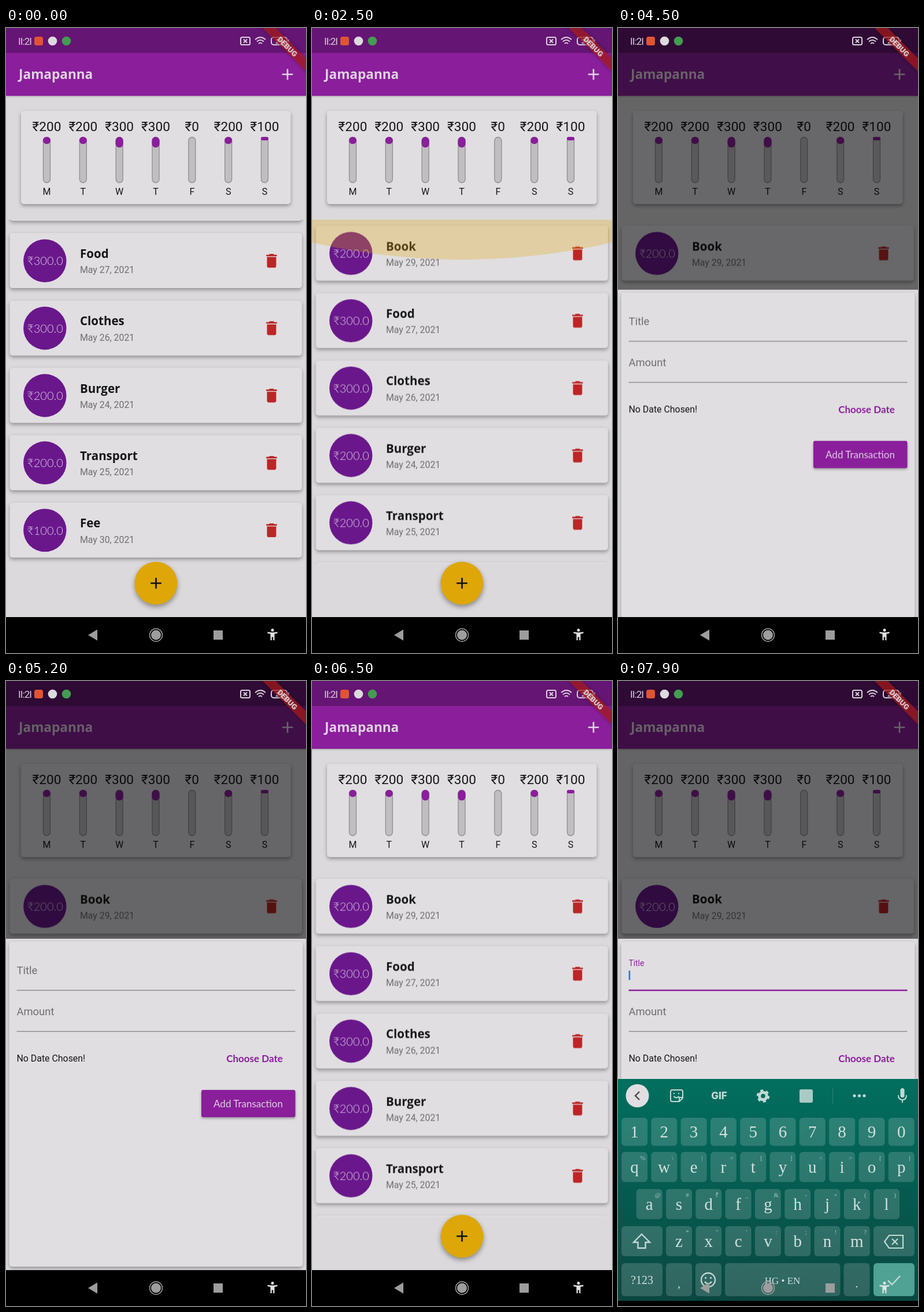
Write an HTML page that moves like this. It is 519 px wide and 1079 px high and loops after 8 s.

```html
<!DOCTYPE html>
<html lang="en">
<head>
<meta charset="utf-8">
<title>Expense tracker</title>
<style>
  html, body { margin: 0; width: 100%; height: 100%; overflow: hidden; background: #000; }
  #stage { display: block; width: 100%; height: 100%; font-family: Roboto, sans-serif; }
  .mid { text-anchor: middle; }
  .bold { font-family: "Open Sans", sans-serif; font-weight: 700; }
  .round { font-family: Lato, sans-serif; }
  .card { fill: #e0dee1; filter: drop-shadow(0 3.5px 3px rgba(0,0,0,.34)); }
  .ink { fill: #161617; }
  .muted { fill: #6f6d70; }
  .line { fill: none; stroke: currentColor; stroke-width: 2; }
  .key { fill: rgba(255,255,255,.16); }
  .glyph { font: 29px "Liberation Serif", serif; fill: #d3e0de; text-anchor: middle; }
  .hint { font: 11px "Liberation Serif", serif; fill: #a9c6c1; text-anchor: middle; }
</style>
</head>
<body>
<svg id="stage" viewBox="0 0 519 1079">
  <defs>
    <linearGradient id="teal" x1="0" y1="0" x2="0" y2="1">
      <stop offset="0" stop-color="#016f5f"/>
      <stop offset="1" stop-color="#0a4741"/>
    </linearGradient>
    <path id="trash" d="M6 19c0 1.1.9 2 2 2h8c1.1 0 2-.9 2-2V7H6v12zM19 4h-3.5l-1-1h-5l-1 1H5v2h14V4z"/>
    <path id="plus" d="M-9.3 0H9.3M0-9.3V9.3" stroke-width="2.7"/>
  </defs>

  <rect width="519" height="1017" fill="#dbd9dc"/>
  <rect y="30" width="519" height="87" fill="#8a1e9b" style="filter:drop-shadow(0 1px 1.5px rgba(0,0,0,.3))"/>
  <rect width="519" height="43" fill="#651573"/>
  <text class="bold" x="22" y="88" font-size="22.6" fill="#e0d5e2">Jamapanna</text>
  <use href="#plus" x="487" y="80" stroke="#e0d5e2"/>
  <g id="chart"><rect class="card" x="26" y="143" width="466.5" height="161" rx="5"/></g>

  <svg y="331" width="519" height="594">
    <g id="list"></g>
    <g id="glow" opacity="0"><circle cx="259.5" cy="-674" r="778" fill="#e2ab10"/></g>
  </svg>

  <circle cx="259.5" cy="958.5" r="37" fill="#dea707" style="filter:drop-shadow(0 4px 4px rgba(0,0,0,.38))"/>
  <g transform="translate(259.5 958.5)"><circle id="ripple" r="37" fill="#fff" opacity="0"/></g>
  <use href="#plus" x="259.5" y="958.5" stroke="#111"/>

  <rect id="scrim" width="519" height="1017" opacity="0"/>

  <g id="sheet">
    <rect y="445" width="519" height="572" fill="#dedcdf"/>
    <rect class="card" x="5.5" y="450" width="508" height="561" rx="5"/>
    <g id="label"><text font-size="18.4">Title</text></g>
    <path d="M18.5 534H500.5M18.5 605H500.5" stroke="#918f92" stroke-width="1.5"/>
    <g id="focus" opacity="0">
      <path d="M18.5 534H500.5" stroke="#8a1e9b" stroke-width="2.7"/>
      <rect x="18.5" y="500" width="2.7" height="16" fill="#2f7bcb"/>
    </g>
    <text class="muted" x="18.5" y="577" font-size="18.4">Amount</text>
    <text class="ink" x="18.5" y="657" font-size="15.9">No Date Chosen!</text>
    <text class="round mid" x="430" y="658" font-size="17" font-weight="700" fill="#8a1e9b">Choose Date</text>
    <rect x="338" y="706" width="162.5" height="47" rx="3" fill="#8a1e9b" style="filter:drop-shadow(0 2px 2px rgba(0,0,0,.35))"/>
    <text class="round mid" x="419" y="736" font-size="17" fill="#dfcfe3">Add Transaction</text>
  </g>

  <g id="status" color="#d9cfdc">
    <text x="21" y="29" font-size="17" letter-spacing="-.9" fill="#d9cfdc">II:2I</text>
    <rect x="49" y="15" width="15" height="15" rx="3.5" fill="#df5534"/>
    <circle cx="80.5" cy="22.5" r="7.8" fill="#dcdade"/>
    <circle cx="104.5" cy="22.5" r="7.8" fill="#429d51"/>
    <rect class="line" x="406" y="16" width="16" height="13" rx="2.5" stroke-width="1.6"/>
    <path class="line" d="M411 19.5l6 6M417 19.5l-6 6"/>
    <path class="line" d="M431 20Q440 12 449 20M434 23.5Q440 18 446 23.5M437 27Q440 24 443 27"/>
    <rect class="line" x="459" y="16" width="27" height="13" rx="4"/>
    <path class="line" d="M488.500 20v5"/>
    <text class="mid" x="472.500" y="27" font-size="11.5" font-weight="700" fill="#d9cfdc">29</text>
  </g>
  <g transform="translate(519 0) rotate(45)">
    <rect x="-60" y="37" width="120" height="16" fill="rgba(183,28,28,.66)" style="filter:drop-shadow(0 0 3px rgba(0,0,0,.45))"/>
    <text class="mid" y="49.800" font-size="13.300" font-weight="900" fill="#ded5d9">DEBUG</text>
  </g>

  <rect y="1017" width="519" height="62"/>
  <g id="keyboard"><rect y="687" width="519" height="383" fill="url(#teal)"/></g>
  <g fill="#9d9d9d">
    <path d="M142 1048l16-9.500v19z"/>
    <circle cx="259.500" cy="1048" r="8.500"/>
    <circle cx="259.500" cy="1048" r="11" fill="none" stroke="#9d9d9d" stroke-width="1.500"/>
    <rect x="359" y="1040" width="16" height="16"/>
  </g>
  <g fill="#e2e2e2">
    <circle cx="461" cy="1039.500" r="2.500"/>
    <path d="M452.500 1042.500q8.500 2 17 0v2.500l-5 1v11h-2.300v-5.500h-2.400v5.500h-2.300v-11l-5-1z"/>
  </g>
</svg>

<script>
const LOOP = 8000;
const $ = id => document.getElementById(id);
const add = (id, markup) => $(id).insertAdjacentHTML('beforeend', markup);
const text = (cls, x, y, str, attrs = '') => `<text class="${cls}" x="${x}" y="${y}" ${attrs}>${str}</text>`;

// Weekly chart
[['M', 200], ['T', 200], ['W', 300], ['T', 300], ['F', 0], ['S', 200], ['S', 100]].forEach(([day, sum], i) => {
  const x = 70.5 + 62.83 * i, h = sum * .061;
  add('chart', text('ink mid', x, 177.5, '₹' + sum, 'font-size="22.6"') +
    `<rect x="${x - 6}" y="188.5" width="12" height="78.5" rx="6" fill="#c0bec1" stroke="#8f8d90" stroke-width="1.3"/>
     <rect x="${x - 6.6}" y="188" width="13.2" height="${h}" rx="${Math.min(6.5, h / 2)}" fill="#8a1e9b"/>` +
    text('ink mid', x, 287.5, day, 'font-size="16"'));
});

// Transactions
[['Book', 200, 29], ['Food', 300, 27], ['Clothes', 300, 26], ['Burger', 200, 24],
 ['Transport', 200, 25], ['Fee', 100, 30], ['Test', 100, 16]].forEach(([name, sum, day], i) => {
  add('list', `<g transform="translate(0 ${10.3 + 116.3 * i})">
    <rect class="card" x="6.5" width="505.500" height="95" rx="5"/>
    <circle cx="67.300" cy="47.800" r="37.200" fill="#6a178c"/>
    ${text('round mid', 67.5, 55.3, `₹${sum}.0`, 'font-size="20" font-weight="300" fill="#dacde0"')}
    ${text('bold ink', 128, 43, name, 'font-size="20.500"')}
    ${text('muted', 128, 69.3, `May ${day}, 2021`, 'font-size="15.850"')}
    <use href="#trash" transform="translate(443.600 32) scale(1.322)" fill="#bb2626"/></g>`);
});

// Keyboard
const key = (x, y, w = 45, h = 52, attrs = '') =>
  `<rect class="key" x="${x}" y="${y}" width="${w}" height="${h}" rx="6" ${attrs}/>`;
const keyRow = (x0, y, letters, hints = '', h = 52) => [...letters].forEach((c, i) => {
  const x = x0 + 51.3 * i;
  const mark = (hints[i] || '').replace('<', '&lt;').replace('&', m => hints[i] === '&' ? '&amp;' : m);
  add('keyboard', key(x, y, 45, h) + text('glyph', x + 22.5, y + h / 2 + 9.5, c) + text('hint', x + 37, y + 14, mark));
});
keyRow(6, 754, '1234567890', '', 48.5);
keyRow(6, 813, 'qwertyuiop', '%\\|=[]<>{}');
keyRow(31.7, 877, 'asdfghjkl', '@#₹_&-+()');
keyRow(83, 941, 'zxcvbnm', '*"\':;!?');
add('keyboard',
  key(6, 941, 71) + key(442, 941, 71) + key(6, 1005, 71, 57) + key(83, 1005, 45, 57) +
  key(134, 1005, 45, 57) + key(185, 1005, 199.5, 57) + key(390.500, 1005, 45, 57) +
  key(442, 1005, 71, 57, 'style="fill:#4fa294"') +
  text('glyph', 41.5, 1041, '?123', 'style="font-size:20px"') +
  text('glyph', 284.5, 1041, 'HG • EN', 'style="font-size:17px"') +
  text('glyph', 105.5, 1047, ',', 'style="font-size:20px"') +
  text('glyph', 413, 1047, '.', 'style="font-size:20px"') +
  text('mid', 175, 722, 'GIF', 'font-family="Inter, sans-serif" font-size="17" font-weight="800" fill="#c3d9d5"') +
  `<circle cx="33.500" cy="716" r="20" fill="#e0dee1"/>
   <path d="M37 709l-7 7 7 7" fill="none" stroke="#444" stroke-width="2.400"/>
   <g class="line" color="#c3d9d5">
     <path d="M94 706h15q3 0 3 3v11l-6 6h-12q-3 0-3-3v-14q0-3 3-3zM112 719h-6v7"/>
     <path d="M96.500 717q4.500 5 9 0M97 711v2M105 711v2"/>
     <circle cx="251" cy="716.500" r="6.300" stroke-width="5"/>
     <circle cx="251" cy="716.500" r="9.500" stroke-width="3.500" stroke-dasharray="4.970"/>
     <path d="M485 715q0 8 7 8t7-8M492 723v5"/>
     <path d="M41 955l14 14h-7.500v10h-13v-10h-7.500z" stroke-width="2.400"/>
     <path d="M469 957h24v22h-24l-8-11zM474 963l10 10M484 963l-10 10" stroke-width="2.200"/>
     <circle cx="156" cy="1034" r="12" stroke-width="2.300"/>
     <path d="M150 1037q6 7 12 0M151.500 1029v3M160.500 1029v3" stroke-width="2.500"/>
     <path d="M467 1035l7 7 14-15" stroke-width="2.500"/>
     <path d="M371.500 702v28" stroke="#2d8477" stroke-width="1"/>
   </g>
   <rect x="314" y="705" width="23" height="23" rx="3" fill="#a9cbc5"/>
   <g fill="#c3d9d5"><circle cx="409" cy="716" r="2.600"/><circle cx="417.500" cy="716" r="2.600"/>
   <circle cx="426" cy="716" r="2.600"/><rect x="488.500" y="703" width="7" height="16" rx="3.500"/></g>`);

// Motion: each step is [ms, value, easing towards the next step]
const OUT = 'cubic-bezier(0,0,.2,1)', FLING = 'cubic-bezier(.15,.5,.4,1)';
function play(id, prop, steps, format = v => v) {
  const all = [[0, ...steps[0].slice(1, 2)], ...steps, [LOOP, steps[steps.length - 1][1]]];
  const frames = all.map(([ms, value, easing = 'linear']) =>
    ({ offset: ms / LOOP, [prop]: format(value), easing }));
  $(id).animate(frames, { duration: LOOP, iterations: Infinity });
}

play('list', 'transform', [
  [350, 103.5, FLING], [1200, 220], [1300, 218, 'ease-in'], [1600, 205.3, FLING],
  [2000, 130], [2250, 130, 'ease-in'], [2450, 0]
], v => `translateY(${-v}px)`);

play('glow', 'transform', [[2380, .1], [2500, .66], [2600, .66, 'ease-in-out'], [3120, .05]], s => `scaleY(${s})`);
play('glow', 'opacity', [[2380, 0], [2480, .3], [2620, .28, 'ease-out'], [3120, 0]]);

play('ripple', 'transform', [[4080, .2], [4350, 1], [6580, 1], [6581, .2], [6850, 1]], s => `scale(${s})`);
play('ripple', 'opacity', [[4080, 0], [4140, .25], [4400, 0], [6580, 0], [6640, .25], [6900, 0]]);

const openClose = (shut, open) => [
  [4200, shut, OUT], [4550, open], [5700, open, 'ease-in'], [6000, shut], [6700, shut, OUT], [7050, open]
];
play('sheet', 'transform', openClose(634, 0), v => `translateY(${v}px)`);
play('scrim', 'opacity', openClose(0, .54));

play('label', 'transform', [[7600, [506, 1], 'ease-out'], [7800, [492, .75]]],
  ([y, s]) => `translate(18.5px, ${y}px) scale(${s})`);
play('label', 'fill', [[7600, '#6f6d70'], [7800, '#8a1e9b']]);
play('focus', 'opacity', [[7600, 0], [7750, 1]]);
play('keyboard', 'transform', [[7650, 392, OUT], [7880, 0]], v => `translateY(${v}px)`);
</script>
</body>
</html>
```
